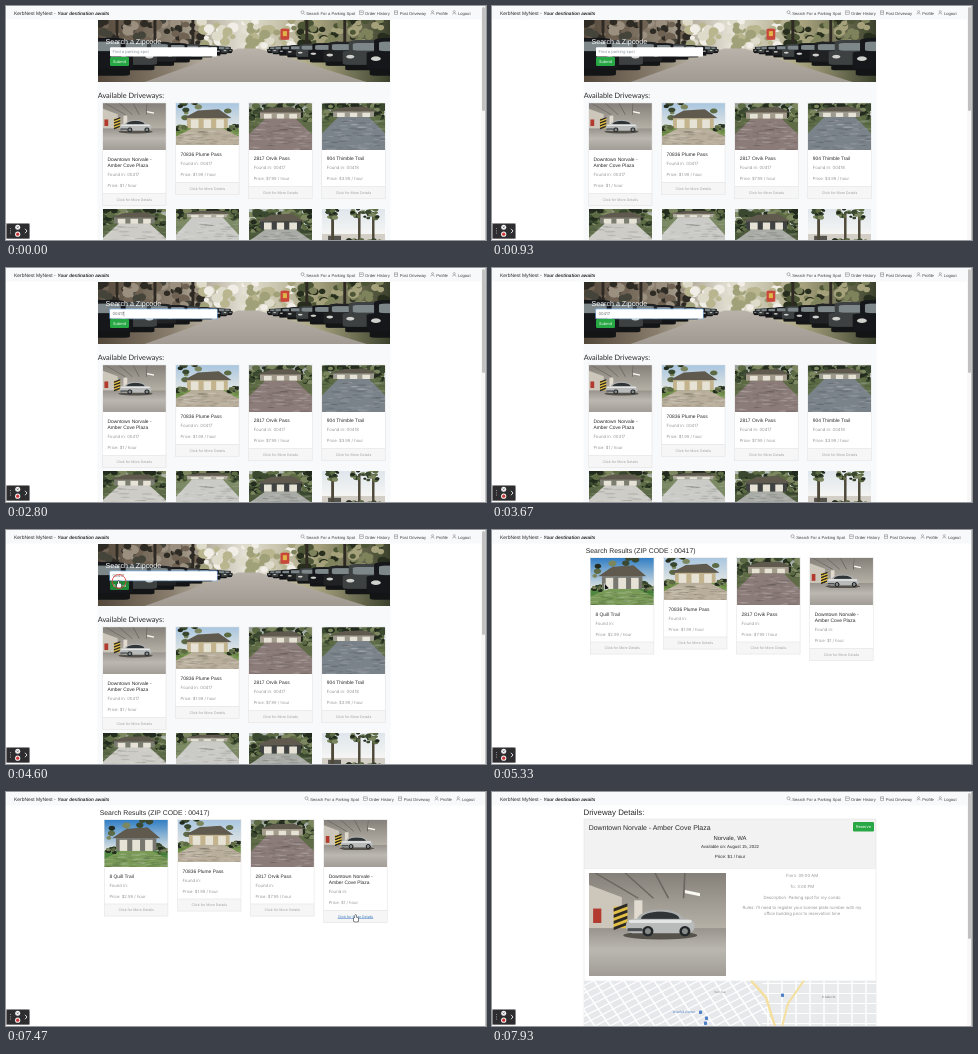
An HTML page with a canvas that plays this animation: 480x234 px, repeating every 8000 ms.

```html
<!DOCTYPE html>
<html lang="en">
<head>
<meta charset="utf-8">
<title>KerbNest MyNest</title>
<style>
html, body { margin: 0; width: 100%; height: 100%; overflow: hidden; background: #fff; }
canvas { display: block; width: 480px; height: 234px; }
</style>
</head>
<body>
<canvas id="stage"></canvas>
<script>
const W = 480, H = 234, LOOP = 8000;
const dpr = window.devicePixelRatio || 1;
const ARIAL = '"Liberation Sans", Arial, sans-serif';
const INTER = 'Inter, sans-serif';
const LATO = 'Lato, sans-serif';
const GREEN = '#28a745', INK = '#2b2b2b', EDGE = '#dfdfdf';
const ZIP = '00417';
const PLAZA = ['Downtown Norvale -', 'Amber Cove Plaza'];

const canvas = document.getElementById('stage');
canvas.width = W * dpr;
canvas.height = H * dpr;
let c = canvas.getContext('2d');
c.scale(dpr, dpr);
c.textRendering = 'geometricPrecision';

// ---- drawing helpers ----
function rect(color, x, y, w, h, r = 0) {
  c.fillStyle = color;
  c.beginPath();
  c.roundRect(x, y, w, h, r);
  c.fill();
}
function frameBox(color, x, y, w, h, width = 0.5) {
  c.strokeStyle = color;
  c.lineWidth = width;
  c.strokeRect(x, y, w, h);
}
function poly(color, ...p) {
  c.fillStyle = color;
  c.beginPath();
  for (let i = 0; i < p.length; i += 2) c.lineTo(p[i], p[i + 1]);
  c.fill();
}
function oval(color, x, y, rx, ry = rx) {
  c.fillStyle = color;
  c.beginPath();
  c.ellipse(x, y, rx, ry, 0, 0, 7);
  c.fill();
}
function line(color, width, ...p) {
  c.strokeStyle = color;
  c.lineWidth = width;
  c.beginPath();
  for (let i = 0; i < p.length; i += 2) c.lineTo(p[i], p[i + 1]);
  c.stroke();
}
function ring(color, width, x, y, r) {
  c.strokeStyle = color;
  c.lineWidth = width;
  c.beginPath();
  c.arc(x, y, r, 0, 7);
  c.stroke();
}
function fade(x0, y0, x1, y1, ...colors) {
  const g = c.createLinearGradient(x0, y0, x1, y1);
  colors.forEach((k, i) => g.addColorStop(i / (colors.length - 1), k));
  return g;
}
function text(s, x, y, size, color = INK, font = ARIAL, align = 'left', style = '') {
  c.font = `${style} ${size}px ${font}`;
  c.textAlign = align;
  c.fillStyle = color;
  c.fillText(s, x, y);
  return c.measureText(s).width;
}
function random(seed) {
  return () => (seed = (seed * 16807) % 2147483647) / 2147483647;
}
function blobs(seed, colors, x, y, w, h, n, rx, ry = rx) {
  const rnd = random(seed * 7919);
  for (let i = 0; i < n; i++) {
    const k = 0.4 + rnd() * 0.6;
    oval(colors[i % colors.length], x + rnd() * w, y + rnd() * h, rx * k, ry * k);
  }
}

// ---- photographs, painted in a 100 by 100 space ----
const TREE = ['#39482f', '#5d6b44', '#222b1d', '#7c8760'];
const GRAIN = ['rgba(255,255,255,.13)', 'rgba(0,0,0,.1)'];

function yard({ seed, sky, pave, lawn, wall, top, trees }) {
  rect(fade(0, 0, 0, top, sky, '#e4e7e4'), 0, 0, 100, 100);
  blobs(seed, TREE, 0, 0, 100, top, trees, 8);
  const eave = top * 0.6;
  rect(wall, 18, eave, 64, top - eave + 2);
  poly('#5f594e', 12, eave, 35, top * 0.3, 68, top * 0.25, 88, eave);
  for (let x = 24; x < 75; x += 20) rect('#e6e2d6', x, eave + 3, 12, top - eave);
  rect(lawn, 0, top, 100, 100 - top);
  poly(pave, 26, top, 74, top, 125, 100, -25, 100);
  blobs(seed + 1, GRAIN, 0, top + 6, 100, 100 - top, 90, 9, 2);
  blobs(seed + 2, TREE, 0, top - 6, 16, 10, 14, 5);
  blobs(seed + 3, TREE, 84, top - 6, 16, 10, 14, 5);
}

function parkedCar(x, y, w, h, body) {
  rect('#131415', x + w * 0.05, y + h * 0.6, w * 0.9, h * 0.4, w * 0.1);
  rect(body, x + w * 0.12, y, w * 0.76, h * 0.6, w * 0.2);
  rect(body, x, y + h * 0.36, w, h * 0.46, w * 0.12);
  rect('#7d878a', x + w * 0.2, y + h * 0.1, w * 0.6, h * 0.25, w * 0.1);
  for (const side of [0.15, 0.85]) oval('#d0d1cc', x + w * side, y + h * 0.55, w * 0.08, h * 0.06);
}
function street() {
  rect(fade(0, 0, 100, 0, '#54483b', '#8a7f6e', '#e4e1d5', '#a8a37f', '#3b412c'), 0, 0, 100, 100);
  blobs(3, ['#6f6253', '#2e2a24', '#9b8f7f', '#45443a'], 0, 0, 36, 45, 90, 2, 8);
  blobs(5, ['#b9b68f', '#dedbcb', '#a0a178', '#f0eee6'], 32, 0, 36, 45, 60, 2, 8);
  blobs(8, ['#4c5536', '#7f835c', '#282e1e', '#a5a17b'], 66, 0, 36, 50, 90, 2, 8);
  for (let x = 6; x < 95; x += 13) if (x < 35 || x > 60) rect('#2e2a23', x, 0, 1, 55);
  poly(fade(0, 45, 0, 100, '#bab3ab', '#a19a93'), 48, 46, 55, 46, 92, 100, 16, 100);
  rect('#c8463a', 62.5, 14, 3, 18, 1);
  rect('#e0b548', 63.3, 18, 1.4, 8);
  for (let i = 0; i < 9; i++) {
    const k = 0.16 * 1.25 ** i, body = ['#202224', '#3d4142', '#15171a'][i % 3];
    for (const side of [-1, 1]) parkedCar(51 + side * 53 * k - 10 * k, 46 - 18 * k, 20 * k + 2, 64 * k, body);
  }
}

function garage() {
  rect(fade(0, 0, 0, 55, '#85817a', '#b7b2a8'), 0, 0, 100, 55);
  poly('#cdc7bb', 0, 12, 24, 24, 24, 58, 0, 66);
  rect(fade(0, 50, 0, 100, '#928e87', '#bbb8b1', '#a29e97'), 0, 54, 100, 46);
  for (let x = 4; x < 80; x += 22) line('#6b6760', 1.2, x, 0, 34 + x / 2, 25);
  poly('#fbfaf2', 70, 17, 81, 20, 81, 23, 70, 20);
  rect('#e0dacf', 33, 27, 6, 24);
  rect('#e2c043', 18, 33, 10, 21);
  for (let y = 35; y < 54; y += 6) poly('#2c2824', 18, y, 28, y - 5, 28, y - 2, 18, y + 3);
  rect('#b23a2f', 3, 35, 6, 14);
  oval('#55514b', 52, 61, 27, 4);
  oval('#aeb0b0', 52, 46, 17, 10);
  oval('#2f3437', 52, 45, 14, 7);
  rect('#b9bbbb', 27, 45, 50, 14, 6);
  rect('#e3e5e4', 29, 46, 46, 3, 2);
  rect('#4a4e50', 28, 54, 11, 3, 1);
  for (const x of [43, 70]) {
    oval('#232628', x, 57, 4, 5);
    oval('#858988', x, 57, 2.2, 3);
  }
}

function palms() {
  rect(fade(0, 0, 0, 60, '#dfe6ec', '#f6f6f4'), 0, 0, 100, 100);
  rect('#d3cfc6', 0, 58, 100, 42);
  rect('#55534d', 10, 62, 20, 38);
  for (const x of [15, 57, 79]) {
    rect('#4d4838', x, 8, 4, 85);
    blobs(x, TREE, x - 9, 0, 20, 22, 16, 5);
  }
  blobs(81, TREE, 40, 70, 60, 20, 40, 6);
}

const PHOTOS = {
  street, garage, palms,
  wideHouse: () => yard({ seed: 11, sky: '#a9c6e0', pave: '#b9ae9b', lawn: '#71904a', wall: '#c3b48e', top: 60, trees: 16 }),
  brick: () => yard({ seed: 21, sky: '#8b968c', pave: '#8b7c79', lawn: '#5f6c47', wall: '#a39b8b', top: 34, trees: 90 }),
  paver: () => yard({ seed: 31, sky: '#8d988e', pave: '#7a828a', lawn: '#5f6f49', wall: '#9c9a8f', top: 30, trees: 100 }),
  blueHouse: () => yard({ seed: 41, sky: '#2f7dc4', pave: '#7a9a58', lawn: '#4f8740', wall: '#77776f', top: 66, trees: 14 }),
  path: () => yard({ seed: 51, sky: '#909a8c', pave: '#cdccc6', lawn: '#5c6a48', wall: '#7b7d70', top: 34, trees: 100 }),
  concrete: () => yard({ seed: 61, sky: '#8d998a', pave: '#cacbc7', lawn: '#7d8a66', wall: '#aeaa9f', top: 20, trees: 60 }),
  modern: () => yard({ seed: 71, sky: '#b4bcb9', pave: '#a9aba6', lawn: '#4d5a3c', wall: '#3f4241', top: 48, trees: 90 })
};

// Each photograph is painted once per size and then reused.
const prints = new Map();
function photo(name, x, y, w, h) {
  const key = name + w;
  if (!prints.has(key)) {
    const print = document.createElement('canvas');
    print.width = w * dpr * 2;
    print.height = h * dpr * 2;
    const outer = c;
    c = print.getContext('2d');
    c.scale(print.width / 100, print.height / 100);
    PHOTOS[name]();
    c = outer;
    prints.set(key, print);
  }
  c.drawImage(prints.get(key), x, y, w, h);
}

function cityMap(w, h) {
  rect('#e6e8eb', 0, 0, w, h);
  rect('#d5e5cd', 245, 2, 13, 11);
  for (let x = -50; x < 220; x += 15) {
    line('#fff', 1.5, x, 0, x + 31, h);
    line('#fff', 1.2, x - 60, h, x + 30, 0);
  }
  poly('#e8eaec', 170, 0, w, 0, w, h, 194, h);
  for (let x = 184; x < w; x += 14) line('#fff', 1.4, x, 0, x, h);
  for (let y = 3; y < h; y += 10) line('#fff', 1.2, 178, y, w, y);
  line('#f4df9e', 2.5, 167, 0, 182, 17, 191, h);
  line('#f4df9e', 2, 198, h, 204, 23, 220, 0);
  for (const [x, y] of [[115, 30], [121, 36], [120, 41], [197, 13]]) rect('#4f81c7', x, y, 3, 3.5, 0.7);
  text('Briarfell Center', 89, 32, 3.3, '#477dc0');
  text('E Alder St', 238, 17, 3, '#777');
  text('Tarn Ave', 130, 12, 3, '#888');
}

// ---- page parts ----
function icon(kind, x, y) {
  const k = '#666';
  if (kind === 'search') {
    ring(k, 0.45, x + 1.8, y - 2, 1.5);
    line(k, 0.5, x + 2.9, y - 0.9, x + 4.2, y + 0.5);
  } else if (kind === 'user') {
    ring(k, 0.4, x + 2, y - 2.6, 1);
    line(k, 0.4, x + 0.3, y + 0.4, x + 0.8, y - 1, x + 3.2, y - 1, x + 3.7, y + 0.4);
  } else {
    frameBox(k, x + 0.3, y - 3.3, 3.4, 3.6, 0.4);
    line(k, 0.4, x + 0.4, y - 1.8, x + 3.6, y - 1.8);
  }
}
function header(shift) {
  rect('#f8f9fa', 0, 0, W, 13.5);
  text('KerbNest MyNest -', 8, 8.8, 4.95);
  text('Your destination awaits', 51.5, 8.8, 4.65, INK, ARIAL, 'left', 'italic bold');
  const items = {
    'Search For a Parking Spot': 'search', 'Order History': 'box', 'Post Driveway': 'box',
    Profile: 'user', Logout: 'user'
  };
  let x = 294.7 + shift;
  for (const label in items) {
    icon(items[label], x, 8.2);
    x += 5.6;
    x += text(label, x, 8.5, 4.15, '#444') + 4.4;
  }
}
function scrollbar(length) {
  rect('#f8f8f8', 475, 0, 4, H);
  rect('#c1c1c1', 476, 1, 3, length, 1.5);
}
function recorder() {
  rect('#2d2d2f', 0.4, 217.4, 23.2, 15.4, 1.5);
  frameBox('#8d8d8f', 0.4, 217.4, 23.2, 15.4);
  for (let y = 222.5; y < 228; y += 2.3) oval('#999', 4.5, y, 0.6);
  oval('#f3f3f3', 11.7, 221.3, 2.5);
  for (const d of [-0.9, 0.9]) line('#555', 0.6, 11.7 - d, 220.4, 11.7 + d, 222.2);
  oval('#f3f3f3', 11.7, 228.2, 2.6);
  oval('#cf3434', 11.7, 228.2, 1.6);
  line('#eee', 0.9, 19, 222.8, 21, 225, 19, 227.2);
}
function card(column, x0, y, name, imgH, lines, price, zip, hover) {
  const x = x0 + column * 73.1, w = 63.5;
  const base = y + imgH + 10.7 + (lines.length - 1) * 6.4;
  const foot = base + 26.3, footH = 12.3;
  rect('#fff', x, y, w, foot + footH - y);
  photo(name, x, y, w, imgH);
  lines.forEach((s, i) => text(s, x + 5, y + imgH + 10.7 + i * 6.4, 4.9));
  text('Found in: ' + zip, x + 5, base + 9, 4.3, '#777', INTER, 'left', '300');
  text(`Price: $${price} / hour`, x + 5, base + 20, 4.2, '#777', INTER, 'left', '300');
  rect('#f6f6f6', x, foot, w, footH);
  rect(EDGE, x, foot, w, 0.5);
  frameBox(EDGE, x, y, w, foot + footH - y);
  const ink = hover ? '#3978bd' : '#a0a0a0', mid = x + w / 2;
  const link = text('Click for More Details', mid, foot + 7.6, 3.5, ink, INTER, 'center');
  if (hover) rect(ink, mid - link / 2, foot + 8.1, link, 0.45);
}
function button(label, x, y, w, h, color = GREEN) {
  rect(color, x, y, w, h, 1.2);
  text(label, x + w / 2, y + h / 2 + 1.4, 3.9, '#fff', INTER, 'center');
}

// ---- pages ----
function home(t) {
  header(0);
  rect('#f8f9fa', 91.5, 13.5, 293, H);
  photo('street', 92, 14, 292, 62);
  text('Search a Zipcode', 99.5, 38, 7.1, '#fff');

  const focused = t > 1200;
  const typed = Math.max(0, Math.min(ZIP.length, Math.ceil((t - 1860) / 150)));
  if (focused) rect('rgba(128,189,255,.55)', 103, 40.2, 109, 11, 1.5);
  rect('#fff', 104, 41.2, 107, 9.2, 1);
  const width = text(ZIP.slice(0, typed), 106.5, 47.3, 4, '#666', INTER);
  if (!typed) text('Find a parking spot', 106.5, 47.3, 4, '#8e979f', INTER);
  if (focused && Math.floor(t / 530) % 2) rect('#333', 106.3 + width, 43.5, 0.4, 4.8);
  button('Submit', 104, 51, 19, 9, t > 4330 ? '#218838' : GREEN);

  text('Available Driveways:', 91.7, 92, 7.35, INK, LATO);
  card(0, 96.5, 97, 'garage', 47, PLAZA, '1', ZIP);
  card(1, 96.5, 97, 'wideHouse', 42, ['70836 Plume Pass'], '1.99', ZIP);
  card(2, 96.5, 97, 'brick', 46.5, ['2817 Orvik Pass'], '7.99', ZIP);
  card(3, 96.5, 97, 'paver', 46.5, ['904 Thimble Trail'], '3.99', '00418');
  ['path', 'concrete', 'modern', 'palms'].forEach((name, i) => photo(name, 96.5 + i * 73.1, 202.5, 63.5, 44));
  scrollbar(104);
}
function results(t) {
  header(4);
  text(`Search Results (ZIP CODE : ${ZIP})`, 93.7, 23, 6.85);
  card(0, 98.4, 27.5, 'blueHouse', 47.3, ['8 Quill Trail'], '2.99', '');
  card(1, 98.4, 27.5, 'wideHouse', 42.3, ['70836 Plume Pass'], '1.99', '');
  card(2, 98.4, 27.5, 'brick', 47.3, ['2817 Orvik Pass'], '7.99', '');
  card(3, 98.4, 27.5, 'garage', 47.3, PLAZA, '1', '', t > 6130);
}
function details() {
  const x = 92, w = 292, mid = x + w / 2;
  header(0);
  text('Driveway Details:', 91.5, 23, 7.9);
  rect('#f2f2f2', x, 27, w, 49);
  rect(EDGE, x, 76, w, 0.5);
  frameBox(EDGE, x, 27, w, H);
  text(PLAZA.join(' '), 96.7, 38, 6.95);
  button('Reserve', 361, 30, 21, 9.5);
  text('Norvale, WA', mid, 48, 5.9, INK, ARIAL, 'center');
  text('Available on: August 15, 2022', mid, 55.7, 4.4, INK, ARIAL, 'center');
  text('Price: $1 / hour', mid, 66.2, 4.5, INK, ARIAL, 'center');
  photo('garage', 97, 80.5, 137, 103);
  const notes = [
    'From: 09:00 AM', 'To: 3:00 PM', 'Description: Parking spot for my condo',
    "Rules: I'll need to register your license plate number with my"
  ];
  const note = (s, y) => text(s, 310, y, 4.25, '#777', INTER, 'center', '300');
  notes.forEach((s, i) => note(s, 85.3 + i * 10.6));
  note('office building prior to reservation time', 123.2);
  c.save();
  c.beginPath();
  c.rect(x, 188.5, w, 46);
  c.clip();
  c.translate(x, 188.5);
  cityMap(w, 46);
  c.restore();
  scrollbar(146);
}

// ---- pointer ----
function ease(t, from, to) {
  const p = Math.max(0, Math.min(1, (t - from) / (to - from)));
  return p * p * (3 - 2 * p);
}
function pointer(x, y, hand) {
  c.save();
  c.translate(x, y);
  if (hand) {
    rect('#222', -2.6, -0.9, 5.4, 5.2, 1.6);
    rect('#222', -1.3, -3.5, 1.9, 5, 0.9);
    rect('#fff', -2.1, -0.4, 4.4, 4.2, 1.3);
    rect('#fff', -0.9, -3.1, 1.1, 5, 0.5);
  } else {
    poly('#fff', -0.5, -1, -0.5, 6.6, 4.8, 4.6);
    poly('#111', 0, 0, 0, 5.6, 3.9, 4.2);
  }
  c.restore();
}
function click(t, at, x, y) {
  const p = (t - at) / 220;
  if (p >= 0 && p < 1) ring('#e23b35', 0.8, x, y, 4.5 + 3 * Math.sqrt(p));
}

function draw(t) {
  const page = t < 4680 ? home : t < 7730 ? results : details;
  rect('#fff', 0, 0, W, H);
  page(t);
  rect('#c4c4c4', 479, 0, 1, H);
  recorder();
  if (t > 4330 && page !== details) {
    const far = ease(t, 5470, 6200);
    pointer(113 + 237 * far, 54 + 72 * far, page === home || t > 6130);
  }
  click(t, 4460, 113, 51.5);
  click(t, 6730, 350, 126);
}

const start = performance.now();
function frame() {
  draw((performance.now() - start) % LOOP);
  requestAnimationFrame(frame);
}
frame();
</script>
</body>
</html>
```
